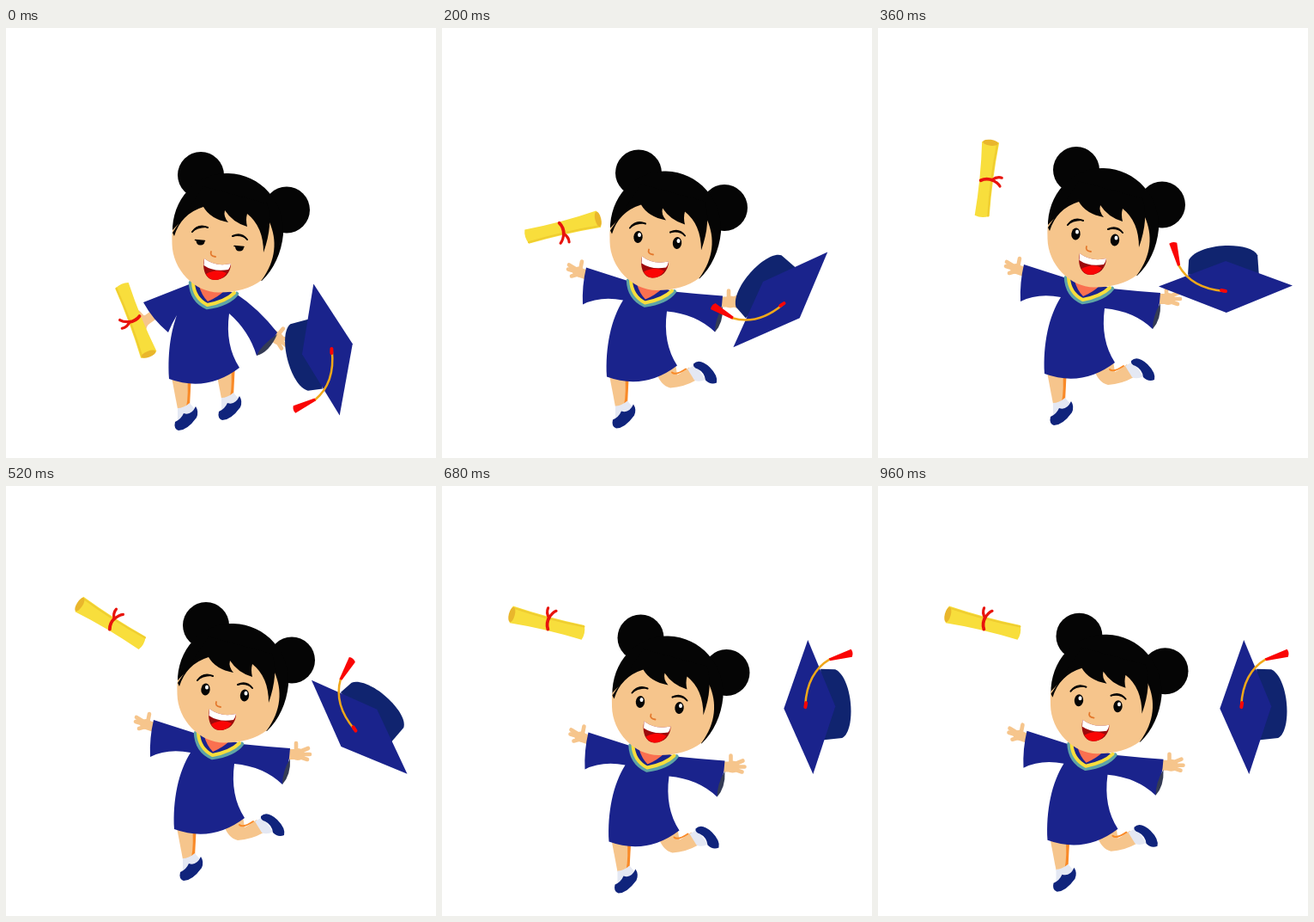
Animation, 501 px wide and 500 px high, one loop 1 s. Source, as an HTML page with a canvas:

```html
<!DOCTYPE html>
<html lang="en">
<head>
<meta charset="utf-8">
<title>Graduation jump</title>
<style>
html, body { margin: 0; width: 100%; height: 100%; overflow: hidden; background: #fff; }
canvas { display: block; }
</style>
</head>
<body>
<canvas id="stage" width="501" height="500"></canvas>
<script>
const ctx = document.getElementById('stage').getContext('2d');
const LOOP = 1000, STEP = 40;
const SKIN = '#f6c58c', BLUE = '#1a238c', NAVY = '#10246f', SHOE = '#10247c',
      HAIR = '#050505', GOLD = '#f0a81a', RED = '#fa0505', SOCK = '#e4e8f3',
      YELLOW = '#f8de3c', ORANGE = '#f98a28', RIBBON = '#e8140c';

// Rows: time, x, y
const girlPath = [[0, -6, 9], [80, -5.5, 9], [200, -4, 6.5], [360, -2, 3], [520, 0, 0],
  [600, -1, 8], [680, -1.5, 14.5], [760, -1, 16.5], [960, 1.5, 12.7]];
const hatPath = [[0, 374.5, 373.8], [80, 382, 340.5], [200, 395, 316.5], [360, 405, 301],
  [520, 411, 281], [675, 428.3, 257]];
// Rows: time, x, y, angle
const scrollPath = [[0, 151, 340, 69], [80, 150, 288, 35], [200, 141, 232, -13.5],
  [360, 126, 175, -83], [410, 123, 161, -104], [520, 121.5, 160, -148],
  [560, 122, 160, -160], [600, 122, 160, -165.5]];

const mix = (a, b, p) => a + (b - a) * p;

function at(keys, t) {
  const i = keys.findIndex(k => k[0] > t);
  if (i < 0) return keys[keys.length - 1].slice(1);
  const a = keys[i - 1], b = keys[i], p = (t - a[0]) / (b[0] - a[0]);
  return a.slice(1).map((v, j) => mix(v, b[j + 1], p));
}

function fill(d, color) {
  ctx.fillStyle = color;
  ctx.fill(new Path2D(d));
}

function line(d, color, width) {
  ctx.strokeStyle = color;
  ctx.lineWidth = width;
  ctx.lineCap = ctx.lineJoin = 'round';
  ctx.stroke(new Path2D(d));
}

function oval(x, y, rx, ry, color, tilt = 0) {
  ctx.fillStyle = color;
  ctx.beginPath();
  ctx.ellipse(x, y, rx, ry, tilt, 0, 7);
  ctx.fill();
}

function place(x, y, deg, draw) {
  ctx.save();
  ctx.translate(x, y);
  ctx.rotate(deg * Math.PI / 180);
  draw();
  ctx.restore();
}

function frontLeg() {
  fill('M198 392L222 392L219 431L206 434Z', SKIN);
  fill('M217 392L222 392L220 431L216 432Q219 418 217 392Z', ORANGE);
  fill('M206 433Q213 433 220 427L226 434L216 446L206 448Z', SOCK);
  fill('M203 449Q210 446 213 439Q222 442 227 431Q231 437 228 444Q217 459 207 459Q201 457 203 449Z', SHOE);
}

function backLeg() {
  fill('M253 392L276 384L278 397Q284 394 292 388L300 403Q286 411 270 412Q258 409 253 392Z', SKIN);
  line('M272 394Q276 398 288 390', ORANGE, 2);
  fill('M290 390L299 385L311 402Q304 406 298 403Z', SOCK);
  fill('M297 384Q304 377 316 388Q326 398 324 406Q317 409 311 403Q310 394 302 390Q296 388 297 384Z', SHOE);
}

function hands(p) {
  place(mix(168, 172, p), mix(279, 329, p), -54 * p, () => {
    oval(-5, -2, 7, 6, SKIN);
    line('M6 2L-3 -1', SKIN, 11);
    line('M-6 -4L-16 -10M-7 -2L-17 -5M-6 1L-13 3M-3 -4L-1 -14', SKIN, 4.6);
  });
  place(mix(335, 319, p), mix(311, 348, p), 39 * p, () => {
    oval(5, 1, 8, 7, SKIN);
    line('M-8 1L2 1', SKIN, 12);
    line('M7 -2L17 -6M8 1L19 1M7 4L16 7M3 -3L3 -12', SKIN, 4.6);
  });
}

function dress(p) {
  const pt = (x, y, x2, y2) => `${mix(x, x2, p)} ${mix(y, y2, p)}`;
  const topL = pt(172, 272, 166, 310), lowL = pt(168, 315, 195, 345),
        topR = pt(331, 305, 322, 345), lowR = pt(322, 347, 298, 372);
  fill(`M222 288L${topL}Q${pt(167, 293, 177, 330)} ${lowL}Q${pt(188, 305, 199, 335)} ${pt(215, 310, 205, 325)}
    C${pt(201, 332, 199, 342)} 194 365 196 399Q240 415 278 386Q261 360 266 323
    Q${pt(300, 326, 289, 343)} ${lowR}Q${pt(330, 326, 313, 362)} ${topR}Q${pt(303, 303, 300, 317)} 274 300
    L245 290Z`, BLUE);
  fill(`M${pt(331, 317, 322, 347)}Q${pt(332, 336, 313, 368)} ${lowR}
    Q${pt(322, 332, 303, 360)} ${pt(331, 317, 322, 347)}Z`, '#343b55');
  line('M221 287Q222 308 240 316Q265 313 275 300', '#5ea4a6', 4.5);
  line('M224 287Q225 305 240.5 313Q262 309 272 299', YELLOW, 4);
  fill('M227 287Q229 303 241 310Q258 306 269 296Z', BLUE);
  fill('M231 291Q234 302 241 309Q253 304 261 296Z', '#fa7050');
}

function eye(x, y, shut) {
  if (!shut) {
    oval(x, y, 5.2, 7, HAIR, .1);
    oval(x + 1.5, y - 2.5, 2, 2.5, '#fff');
    return;
  }
  fill(`M${x - 6} ${y + 1}L${x + 5} ${y + 2}Q${x + 5} ${y + 7} ${x} ${y + 7}Q${x - 5} ${y + 7} ${x - 5} ${y + 1}Z`, HAIR);
  line(`M${x - 6} ${y + 1}L${x + 5} ${y + 2}`, HAIR, 1.5);
}

function head(shut) {
  oval(233, 162, 27, 27, HAIR);
  oval(333, 202.5, 27, 27, HAIR);
  fill('M200 229C199 190 228 159 265 160C303 161 331 193 329 231C327 252 318 272 304 285L240 240Z', HAIR);
  fill(`M200 226C199 231 199.5 236 199.5 242C200 272 226 298.5 254 298.5C274 298.5 291 294 304 284
    C321 261 322 237 313 217L285 195L235 190Z`, SKIN);
  // Fringe
  fill(`M200 229L236 175L310 195Q318 218 306 252Q306 222 287 207Q285 214 287 222
    Q270 217 261 203Q259 210 265 217Q244 213 236 199Q210 207 202 233Z`, HAIR);
  place(0, shut ? 2 : 0, 0, () => {
    fill('M222 227Q229 215 242 221Q230 220 222 227Z', HAIR);
    fill('M269 232Q280 225 288 236Q280 229 269 232Z', HAIR);
    line('M223 226Q230 216.5 241 221M270 231Q280 226 287 235', HAIR, 2);
  });
  eye(232.5, 236.5, shut);
  eye(278, 243.5, shut);
  line('M245 251Q243 256 250 257', '#e3782c', 1.8);
  fill('M237 259C234 272 239 284 249 284C260 284 268 276 268 265Q250 269 237 259Z', '#9c0a0c');
  fill('M237 259Q250 269 268 265Q267 270 265 272Q248 275 236.5 267Z', '#fff');
  fill('M239 277Q252 270 263 276Q258 284 249 284Q242 283 239 277Z', RED);
}

function girl(t) {
  const p = Math.max(0, 1 - t / 80), [x, y] = at(girlPath, t);
  place(x, y, 0, () => {
    frontLeg();
    if (p > .5) place(51, -12, 0, frontLeg);
    else backLeg();
    hands(p);
    dress(p);
    head(p > .5);
  });
}

function hat(t) {
  const [x, y] = at(hatPath, t);
  place(x, y, Math.min(.28 * t, 189) - 100.5, () => {
    fill('M-44 -14L-43 -31C-33 -51 28 -54 37 -37L39 -11Z', NAVY);
    fill('M78 -2L1 30L-78 0L0 -30Z', BLUE);
    line('M-2 5Q-40 2 -55 -25', GOLD, 2.5);
    line('M-5 4L0 5', RED, 4);
    fill('M-56 -24L-66 -50Q-62 -53 -57 -51L-53 -25Z', RED);
  });
}

function diploma(t) {
  const [x, y, angle] = at(scrollPath, t);
  place(x, y, angle, () => {
    fill('M-44 -8Q0 -6 42 -10Q47 0 43 10Q0 7 -43 9Q-47 0 -44 -8Z', YELLOW);
    line('M-43 7.5Q0 5 40 8', '#efcd30', 2);
    oval(42, 0, 3.5, 9, '#e9b62c');
    line('M-3 -6Q1 0 -1 8', RIBBON, 3.8);
    line('M-1 7Q-3 14 -7 17M-1 7Q4 12 3 18', RIBBON, 3.2);
  });
}

function draw(now) {
  const t = Math.floor(now % LOOP / STEP) * STEP;
  ctx.clearRect(0, 0, 501, 500);
  girl(t);
  hat(t);
  diploma(t);
  requestAnimationFrame(draw);
}

draw(0);
</script>
</body>
</html>
```
